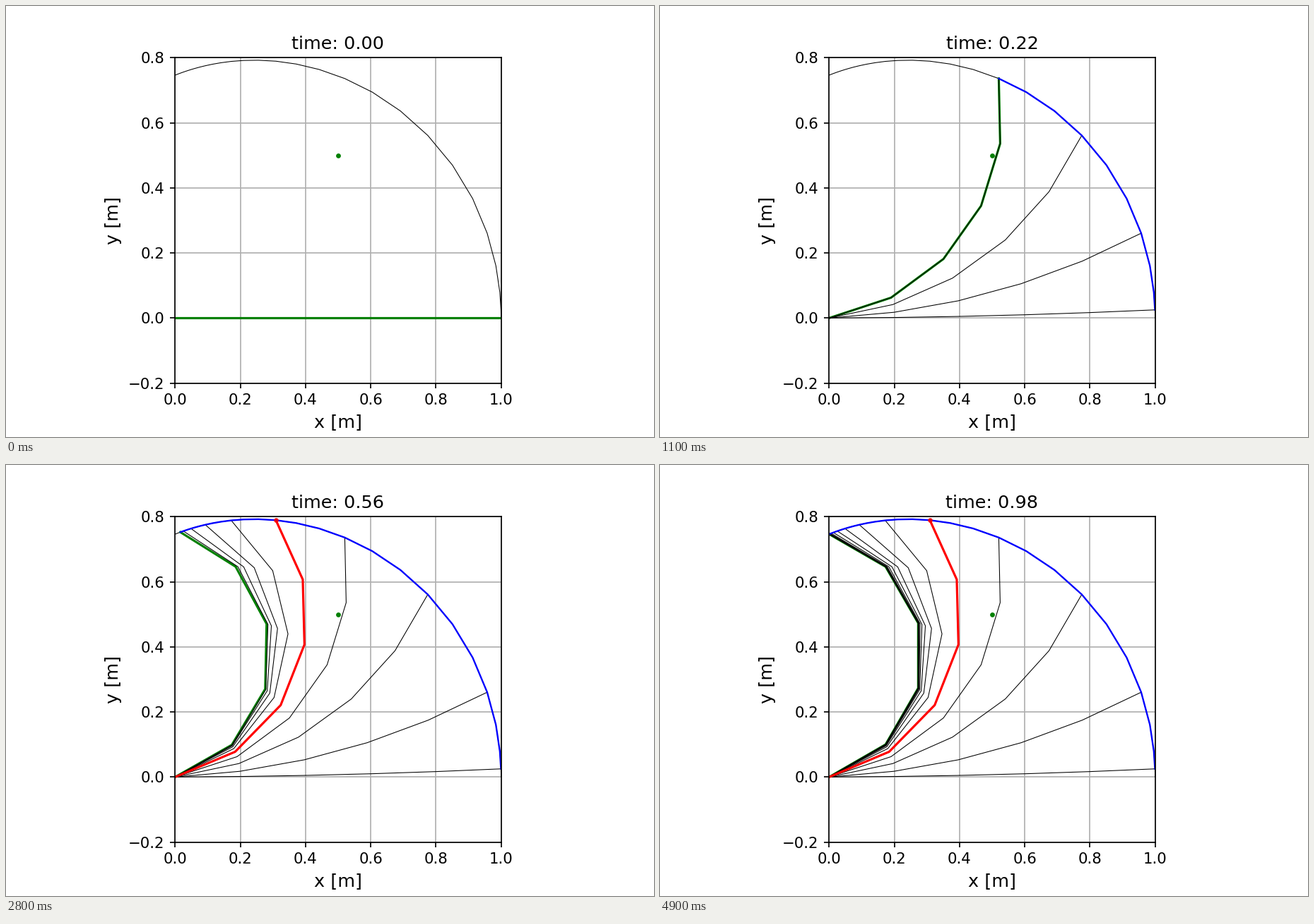
A matplotlib script that plays this animation: 917 px wide and 611 px high, repeating every 5000 ms.

```python
import numpy as np
import matplotlib.pyplot as plt
from matplotlib.animation import FuncAnimation

DPI = 152.75
FRAMES = 50
DT = 0.02
LINKS = 5
LENGTH = 0.2
TARGET = np.radians(30)
SNAP_EVERY = 3
RELEASE = 14


def joint_angle(k):
    """Third-order step response towards the target, with a soft start."""
    x = max(0.0, 0.286 * k - 0.1 * np.exp(-k / 3))
    return TARGET * (1 - (1 + x + x * x / 2) * np.exp(-x))


def arm(k):
    angles = joint_angle(k) * np.arange(1, LINKS + 1)
    x = np.concatenate([[0], np.cumsum(LENGTH * np.cos(angles))])
    y = np.concatenate([[0], np.cumsum(LENGTH * np.sin(angles))])
    return x, y


arms = [arm(k) for k in range(FRAMES)]
tips = np.array([(x[-1], y[-1]) for x, y in arms])

plt.rcParams["font.family"] = "DejaVu Sans"
fig, ax = plt.subplots(figsize=(917.001 / DPI, 611.001 / DPI), dpi=DPI)
fig.subplots_adjust(left=0.125, right=0.9, bottom=0.125, top=0.88)
ax.set_aspect("equal")
ax.set(xlim=(0, 1), ylim=(-0.2, 0.8))
ax.set_xlabel("x [m]", fontsize=12)
ax.set_ylabel("y [m]", fontsize=12)
ax.set_xticks(np.arange(0, 1.1, 0.2))
ax.set_yticks(np.arange(-0.2, 0.9, 0.2))
ax.grid(True)
title = ax.set_title("time: 0.00", fontsize=12)

ax.plot(*tips.T, color="black", lw=0.5, zorder=2.0)
ax.plot(0.5, 0.5, "o", color="green", ms=2.2, zorder=2.0)
current, = ax.plot([], [], color="green", lw=1.5, zorder=2.1)
snapshots = {
    k: ax.plot(*arms[k], color="black", lw=0.5, zorder=2.2)[0]
    for k in range(2, FRAMES, SNAP_EVERY) if k != RELEASE
}
snapshots[RELEASE], = ax.plot(*arms[RELEASE], color="red", lw=1.5, zorder=2.3)
trail, = ax.plot([], [], color="blue", lw=1.1, zorder=2.35)
release_dot, = ax.plot(*tips[RELEASE], "o", color="red", ms=2.2, alpha=0.75,
                       zorder=2.4)


def update(k):
    title.set_text(f"time: {k * DT:.2f}")
    current.set_data(*arms[k])
    trail.set_data(*tips[2:k + 1].T)
    for step, line in snapshots.items():
        line.set_visible(k >= step)
    release_dot.set_visible(k >= RELEASE)
    return [title, current, trail, release_dot, *snapshots.values()]


anim = FuncAnimation(fig, update, frames=FRAMES, interval=100,
                     init_func=lambda: update(0), repeat=True,
                     repeat_delay=0, blit=False)
plt.show()
```
